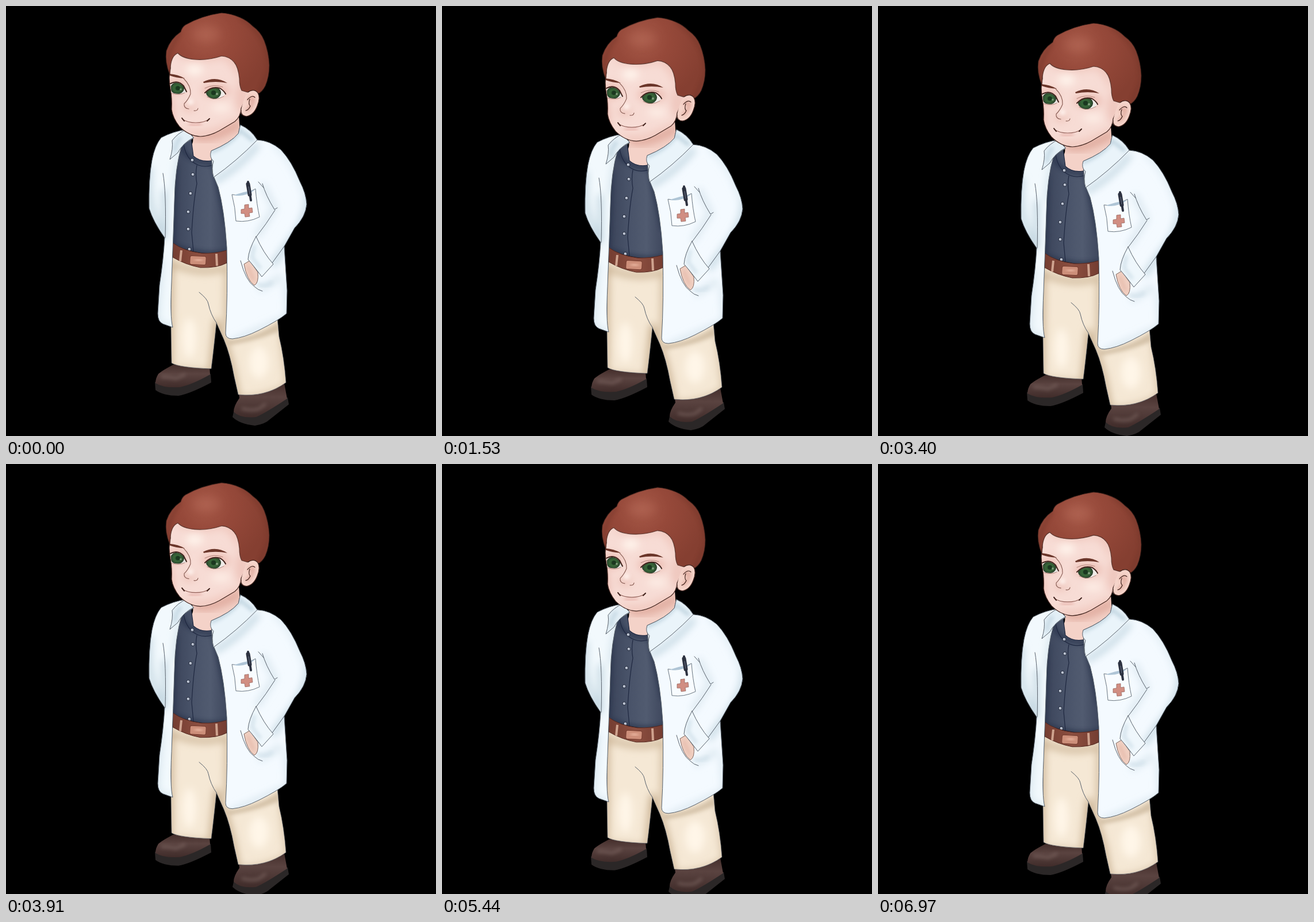
An HTML page for the animation above (8.16 s loop, 748x748 px).

```html
<!DOCTYPE html>
<html lang="en">
<head>
<meta charset="utf-8">
<title>Young doctor</title>
<style>
  html, body { margin: 0; width: 100%; height: 100%; overflow: hidden; background: #000; }
  svg { display: block; width: 100%; height: 100%; }
  .line { fill: none; stroke: #59626c; stroke-width: 1; stroke-linecap: round; stroke-linejoin: round; }
  .dark { fill: none; stroke: #40231d; stroke-width: 1.2; stroke-linecap: round; stroke-linejoin: round; }
  .soft { filter: url(#blur); }
  .wide { filter: url(#haze); }
</style>
</head>
<body>
<svg viewBox="0 0 748 748">
  <defs>
    <filter id="blur" x="-50%" y="-50%" width="200%" height="200%"><feGaussianBlur stdDeviation="3"/></filter>
    <filter id="haze" x="-50%" y="-50%" width="200%" height="200%"><feGaussianBlur stdDeviation="7"/></filter>
    <radialGradient id="hairFill" gradientUnits="userSpaceOnUse" cx="348" cy="50" r="112">
      <stop offset="0" stop-color="#a75a49"/><stop offset=".4" stop-color="#96493a"/><stop offset="1" stop-color="#853f31"/>
    </radialGradient>
    <linearGradient id="shirtFill">
      <stop offset="0" stop-color="#3a4359"/><stop offset=".35" stop-color="#485268"/>
      <stop offset=".7" stop-color="#515b70"/><stop offset="1" stop-color="#3f485e"/>
    </linearGradient>
    <linearGradient id="beltFill">
      <stop offset="0" stop-color="#743d31"/><stop offset=".5" stop-color="#8d4f40"/><stop offset="1" stop-color="#743d32"/>
    </linearGradient>
    <linearGradient id="shoeFill" x2="0" y2="1">
      <stop offset="0" stop-color="#442e2b"/><stop offset=".4" stop-color="#5a4340"/><stop offset="1" stop-color="#402c2a"/>
    </linearGradient>
    <radialGradient id="iris">
      <stop offset="0" stop-color="#264f2a"/><stop offset=".55" stop-color="#386739"/><stop offset="1" stop-color="#2a452c"/>
    </radialGradient>

    <path id="face" d="M284 88L286 108Q282 124 286 145Q289 160 288 180Q290 195 302 210Q318 226 338 227Q355 226 371 217L398 201Q408 193 409 178L422 150L408 90L300 76Z"/>
    <path id="neck" d="M324 224Q328 236 321 245L326 262Q339 272 357 270L357 252Q391 240 407 220L405 192L340 212Z"/>
    <path id="hair" d="M285 119Q276 98 279 78Q286 57 304 45Q306 37 312 33Q340 17 375 12Q391 13 407 20Q419 25 429 35Q443 45 449 60Q457 80 458 103Q458 123 451 139Q446 149 438 153Q433 144 420 150L410 147Q406 140 406 126Q404 106 397 98Q389 88 375 87Q351 95 328 93Q307 91 299 82Q288 86 286 106Z"/>
    <path id="ear" d="M409 181Q414 158 421 150Q431 143 438 151Q443 159 437 174Q431 190 418 192Q408 191 408 183Z"/>
    <path id="eyeL" d="M286 136Q299 129 309 140L314 150Q303 155 288 151Z"/>
    <path id="eyeR" d="M347 151Q358 139 372 143Q379 147 382 153Q376 162 361 162Q350 159 347 151Z"/>
    <path id="shirt" d="M306 240L322 231L326 261Q338 272 357 269L368 310Q383 360 384 430Q340 436 289 415Q292 360 295 300Q298 265 306 240Z"/>
    <path id="legs" d="M290 434L287 480L287 560L288 621Q301 629 357 631Q361 600 366 551L379 580Q390 606 397 645L404 676Q451 681 487 655Q484 612 475 575L470 520L384 440Z"/>
    <path id="coatL" d="M313 215Q291 218 270 229Q259 242 254 268Q248 300 249 352Q256 375 276 403Q274 440 267 486L264 535Q264 549 273 553L290 559Q285 541 288 480Q291 400 293 340Q294 280 306 242L326 230Z"/>
    <path id="coatR" d="M408 207Q426 215 437 233Q459 234 478 250Q497 270 511 305Q522 326 523 345Q521 367 502 386L484 418Q486 450 489 495L488 535Q474 547 440 564Q414 577 394 579Q382 579 382 569Q386 505 384 420Q380 355 369 315L359 291L357 252Q391 238 404 222Z"/>
    <path id="collarL" d="M313 215Q299 221 289 234Q291 248 285 267L299 255Q308 238 326 229Z"/>
    <path id="collarR" d="M408 207Q426 215 437 233Q401 270 361 298Q357 281 361 270Q353 263 357 252Q391 238 404 222Z"/>
    <path id="cuff" d="M435 401Q422 424 421 441Q431 452 445 471L465 449Q448 430 435 401Z"/>
    <path id="hand" d="M414 449L424 443L438 463Q440 482 432 486Q419 477 414 449Z"/>

    <clipPath id="inFace"><use href="#face"/></clipPath>
    <clipPath id="inNeck"><use href="#neck"/></clipPath>
    <clipPath id="inHair"><use href="#hair"/></clipPath>
    <clipPath id="inEyeL"><use href="#eyeL"/></clipPath>
    <clipPath id="inEyeR"><use href="#eyeR"/></clipPath>
    <clipPath id="inShirt"><use href="#shirt"/></clipPath>
    <clipPath id="inLegs"><use href="#legs"/></clipPath>
    <clipPath id="inCoatL"><use href="#coatL"/></clipPath>
    <clipPath id="inCoatR"><use href="#coatR"/></clipPath>
    <clipPath id="inCollarR"><use href="#collarR"/></clipPath>
  </defs>

  <g id="boy">
    <!-- shoes -->
    <path fill="#2b2727" d="M259 654L260 668Q273 678 300 678Q319 675 357 655L356 640Z"/>
    <path fill="url(#shoeFill)" d="M291 624Q270 635 265 640Q260 648 260 656Q274 665 303 663Q325 658 355 641L354 627Z"/>
    <path fill="#2b2727" d="M396 706L394 715Q406 727 433 730Q451 727 459 719L492 693L490 681Z"/>
    <path fill="url(#shoeFill)" d="M405 674L406 682Q396 696 396 706Q408 718 435 715Q453 707 489 683L484 656Z"/>
    <path class="soft" fill="none" stroke="#8d7671" stroke-width="4" opacity=".6" d="M270 645Q282 645 296 648L312 641M410 700Q425 705 440 701L452 692"/>

    <!-- trousers -->
    <use href="#legs" fill="#f5e8d5"/>
    <g clip-path="url(#inLegs)">
      <g class="wide" fill="none" stroke="#c9b192" stroke-width="11">
        <path d="M286 440L284 630M367 545L357 640M368 555Q392 610 402 684"/>
        <path d="M290 449Q340 470 386 454L385 560" opacity=".8"/>
        <path d="M480 560L491 660M284 633L358 638M404 684Q455 684 490 660" opacity=".65"/>
      </g>
      <path class="soft" d="M384 582Q440 575 474 549L476 565Q439 582 388 590Z" fill="#cbb79c" opacity=".75"/>
      <g class="wide" fill="#fff6e8"><ellipse cx="319" cy="578" rx="12" ry="35"/><ellipse cx="440" cy="620" rx="17" ry="28"/></g>
    </g>
    <use href="#legs" class="line" stroke-opacity=".65"/>
    <path class="line" d="M336 498Q351 510 352 518Q356 537 366 551"/>

    <!-- neck and shirt -->
    <use href="#neck" fill="#f4d2c8"/>
    <g clip-path="url(#inNeck)">
      <path class="wide" d="M326 222Q352 237 408 204" fill="none" stroke="#d99f91" stroke-width="16" opacity=".75"/>
    </g>
    <use href="#shirt" fill="url(#shirtFill)"/>
    <g clip-path="url(#inShirt)">
      <path class="soft" d="M295 280L291 415Q340 435 384 427M358 268L383 380" fill="none" stroke="#27304a" stroke-width="7" opacity=".6"/>
      <path class="soft" d="M304 240Q310 270 358 274" fill="none" stroke="#27304a" stroke-width="8" opacity=".6"/>
    </g>
    <g fill="none" stroke="#1f2840" stroke-width="1.2">
      <use href="#shirt"/>
      <path d="M309 241Q314 269 335 277Q346 281 359 277M332 277Q329 292 332 309Q326 340 323 394L326 427"/>
    </g>
    <g id="buttons" fill="#a5adbd" stroke="#222a3c"></g>

    <!-- belt -->
    <path fill="url(#beltFill)" stroke="#53271f" d="M290 412Q309 426 340 430Q364 431 384 425L384 447Q367 456 338 455Q312 450 290 437Z"/>
    <path fill="none" stroke="#cfa38f" stroke-width="4" d="M305 425L303 444M366 431L367 452"/>
    <rect x="320" y="435" width="28" height="15" rx="3" fill="#cd8f7a" stroke="#733b2e" transform="rotate(3 334 442)"/>
    <path class="soft" d="M329 441L341 443" stroke="#efbda8" stroke-width="5"/>

    <!-- coat, left side -->
    <use href="#coatL" fill="#f2f9fd"/>
    <g clip-path="url(#inCoatL)">
      <g class="wide" fill="none" stroke="#b9cfda" stroke-width="8">
        <path d="M250 280Q242 350 276 405M276 320L275 405"/>
        <path d="M270 440L261 550L290 563M305 250Q297 280 294 320" opacity=".6"/>
      </g>
    </g>
    <use href="#coatL" class="line"/>
    <path class="line" d="M273 291Q279 323 277 403"/>
    <use href="#collarL" fill="#e3eff6"/>
    <path class="soft" d="M304 228Q294 240 294 254" fill="none" stroke="#b5ccd9" stroke-width="6" opacity=".65"/>
    <use href="#collarL" class="line"/>

    <!-- coat, right side -->
    <use href="#coatR" fill="#f4faff"/>
    <g clip-path="url(#inCoatR)">
      <g class="wide" fill="none" stroke="#bfd4df" stroke-width="9">
        <path d="M439 240Q405 282 362 305M525 330Q525 372 485 420L464 451"/>
        <path d="M446 310L467 352L436 401M440 494L480 470M488 480L492 540L390 585" opacity=".55"/>
        <path d="M465 238Q501 267 523 335" opacity=".4"/>
      </g>
    </g>
    <use href="#coatR" class="line"/>
    <path class="line" d="M439 306L448 316M446 309Q452 330 467 354L472 351M468 355Q453 379 435 402M484 418L463 447"/>
    <use href="#collarR" fill="#eaf4fa"/>
    <g clip-path="url(#inCollarR)">
      <path class="soft" d="M356 254Q392 239 407 216L430 234" fill="none" stroke="#b4cbd8" stroke-width="7" opacity=".7"/>
    </g>
    <use href="#collarR" class="line"/>

    <!-- chest pocket -->
    <path fill="#f8fcff" stroke="#6b7680" d="M393 328Q410 332 434 318Q436 345 441 367Q421 377 400 374Q399 350 393 328Z"/>
    <path d="M396 329Q414 323 433 320Q416 333 396 329Z" fill="#afc5d6"/>
    <path d="M421 310L424 328" stroke="#2d3240" stroke-width="7" stroke-linecap="round"/>
    <path d="M421 306L426 338" stroke="#2d3240" stroke-width="4" stroke-linecap="round"/>
    <path d="M422 314L424 327" stroke="#565e70" stroke-width="1.5"/>
    <path fill="#d18e82" stroke="#99665f" stroke-width=".8" d="M415 346L422 345L422 352L428 351L429 359L423 360L424 366L416 367L415 361L409 361L409 354L415 353Z"/>

    <!-- hand and cuff -->
    <path class="soft" d="M437 484Q452 490 464 480" fill="none" stroke="#cbdde7" stroke-width="7" opacity=".6"/>
    <use href="#hand" fill="#f0cfc1" stroke="#80675f"/>
    <path class="soft" d="M420 452L431 477" stroke="#dfae9d" stroke-width="3"/>
    <path class="line" d="M408 443Q417 478 432 488Q438 494 446 496"/>
    <use href="#cuff" fill="#eff7fc"/>
    <path class="soft" d="M432 416L428 437L443 457" fill="none" stroke="#c1d5e1" stroke-width="5" opacity=".7"/>
    <use href="#cuff" class="line"/>

    <!-- head -->
    <use href="#face" fill="#f7dcd5"/>
    <g clip-path="url(#inFace)">
      <g class="wide" fill="#e8b3a7">
        <ellipse cx="365" cy="147" rx="25" ry="12" opacity=".7"/>
        <ellipse cx="296" cy="140" rx="17" ry="14" opacity=".7"/>
        <ellipse cx="410" cy="160" rx="12" ry="27" opacity=".5"/>
        <ellipse cx="318" cy="176" rx="12" ry="9" opacity=".5"/>
        <ellipse cx="285" cy="185" rx="8" ry="30" opacity=".6"/>
        <path d="M289 85Q330 104 376 93Q397 103 406 140L411 80Z" opacity=".45"/>
        <path d="M303 207Q335 232 405 193L410 217L330 235Z" opacity=".45"/>
      </g>
      <g class="wide" fill="#fff4ec">
        <ellipse cx="328" cy="111" rx="15" ry="9"/><ellipse cx="374" cy="177" rx="17" ry="8" opacity=".7"/>
      </g>
      <ellipse class="soft" cx="321" cy="167" rx="5" ry="5" fill="#fff4ef"/>
    </g>
    <use href="#face" class="dark"/>

    <use href="#eyeL" fill="#e6e2de"/>
    <g clip-path="url(#inEyeL)">
      <ellipse cx="298" cy="143" rx="11.5" ry="10" fill="url(#iris)" stroke="#253b28"/>
      <circle cx="299" cy="143" r="3.8" fill="#1b3820"/><circle cx="304" cy="145" r="1.8" fill="#7f9c7c"/>
    </g>
    <use href="#eyeR" fill="#efebe7"/>
    <g clip-path="url(#inEyeR)">
      <ellipse cx="361" cy="151" rx="12.5" ry="10.5" fill="url(#iris)" stroke="#253b28"/>
      <circle cx="361" cy="151" r="4" fill="#1b3820"/><circle cx="367" cy="153" r="2" fill="#7f9c7c"/>
    </g>
    <g class="dark">
      <path stroke-width="2" d="M286 135Q299 128 309 139L314 149M346 151Q357 139 372 143Q379 147 382 153"/>
      <path stroke="#a17167" stroke-width=".8" d="M289 152Q301 156 311 151M350 158Q364 166 379 157M346 143Q361 135 377 141"/>
      <path stroke="#8b6057" d="M309 126Q322 139 321 153Q317 163 310 170Q309 178 318 179M327 182Q333 183 334 178"/>
      <path stroke="#8f5e56" d="M307 197Q316 203 330 203Q345 203 353 197"/>
      <path stroke-width="2" d="M306 195L310 200M350 200L354 196"/>
    </g>
    <path d="M318 206Q330 209 340 205" class="soft" fill="none" stroke="#df9b94" stroke-width="3"/>
    <path fill="#6a3529" d="M285 118Q299 119 311 126Q295 125 285 121ZM343 132Q365 121 385 134Q365 130 344 134Z"/>

    <use href="#hair" fill="url(#hairFill)"/>
    <g clip-path="url(#inHair)">
      <path class="soft" d="M285 119Q274 85 304 46M407 20Q460 55 457 110L438 156" fill="none" stroke="#6b3025" stroke-width="5" opacity=".4"/>
      <ellipse class="wide" cx="348" cy="49" rx="24" ry="13" fill="#b56958" opacity=".4"/>
    </g>
    <use href="#hair" class="dark" stroke-opacity=".75"/>

    <use href="#ear" fill="#f5d4ca"/>
    <path class="soft" d="M421 164Q429 155 431 164Q426 178 418 182" fill="none" stroke="#d99b8d" stroke-width="4"/>
    <path class="dark" d="M409 181Q408 191 418 192Q431 190 437 174Q443 159 438 151Q431 143 421 150M420 163Q428 154 433 159M424 162Q421 171 425 174Q422 181 417 182"/>
  </g>
</svg>
<script>
  const LOOP = 8160, TICK = 170, LAST = 41, DROP = 0.9;
  const boy = document.getElementById('boy');

  document.getElementById('buttons').innerHTML =
    [[324, 268], [325, 293], [321, 326], [317, 358], [317, 388], [319, 423]]
      .map(([x, y]) => `<circle cx="${x}" cy="${y}" r="3"/><circle cx="${x - .6}" cy="${y - .6}" r="1" fill="#e8edf5" stroke="none"/>`)
      .join('');

  const start = performance.now();

  // Sinks a little on every tick, then rests before the loop restarts.
  function draw(now) {
    const t = Math.max(0, now - start) % LOOP;
    const step = Math.min(LAST, Math.floor(t / TICK));
    boy.setAttribute('transform', `translate(0 ${(step * DROP).toFixed(2)})`);
    requestAnimationFrame(draw);
  }
  draw(start);
</script>
</body>
</html>
```
